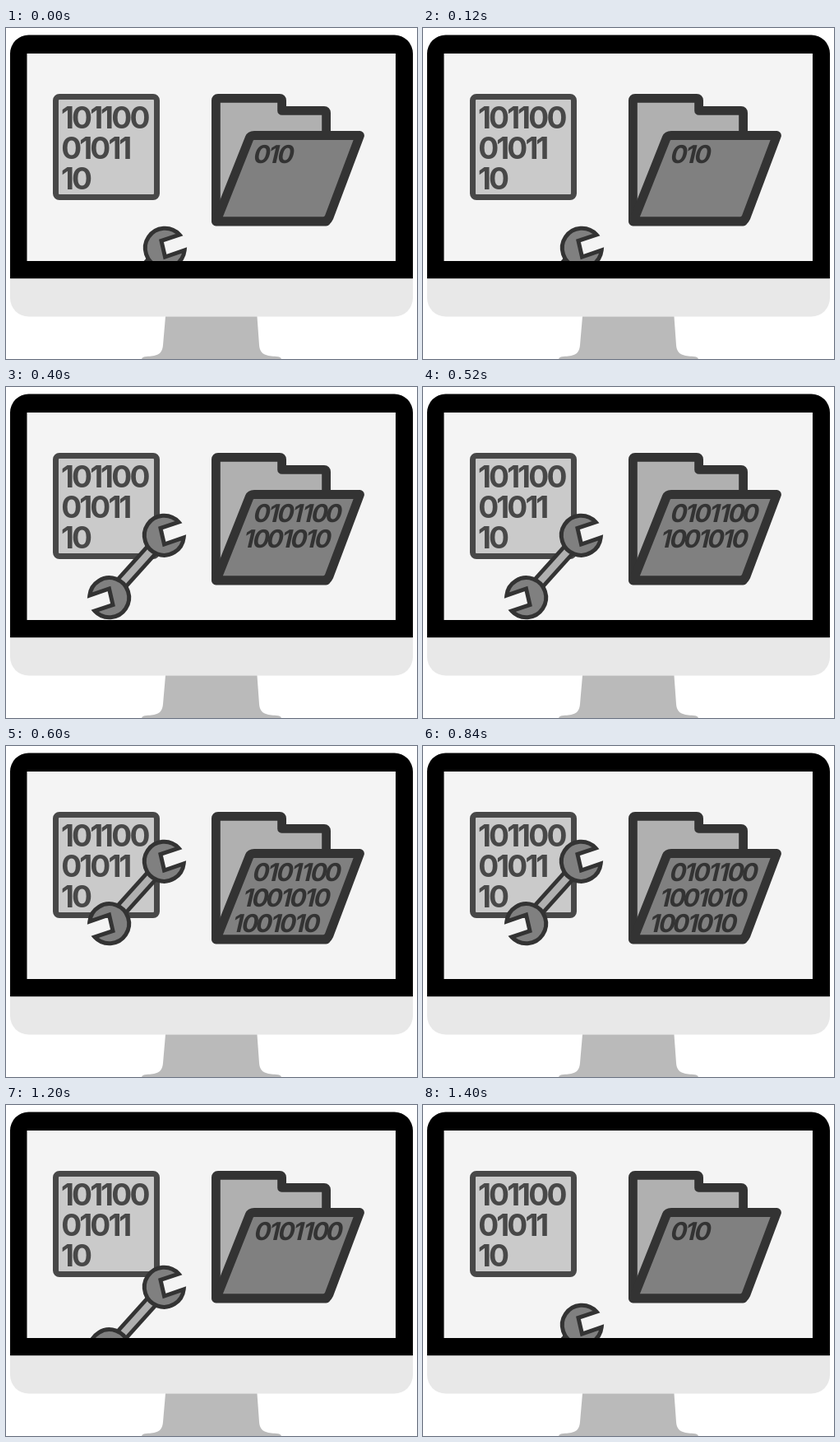
Animation, 500 px wide and 402 px high, one loop 1.6 s. Source, as an HTML page:

```html
<!DOCTYPE html>
<html lang="en">
<head>
<meta charset="utf-8">
<title>File repair</title>
<style>
html, body { margin: 0; width: 100%; height: 100%; overflow: hidden; background: #fff; }
svg { display: block; }
text { font: 700 37px Inter, sans-serif; fill: #484848; text-anchor: middle; }
.small text { font-size: 30px; fill: #333; }
.ink { stroke: #333; }
</style>
</head>
<body>
<svg width="500" height="402" viewBox="0 0 500 402">
  <defs>
    <path id="head" class="ink" fill="#808080" stroke-width="5"
      d="M210 124A24 24 0 1 0 216.200 143L192.500 151L188 131.500Z"/>
  </defs>
  <path fill="#f4f4f4" d="M20 25H480V290H20Z"/>

  <rect x="60.5" y="83.5" width="123" height="122" rx="4.5" fill="#cacaca" stroke="#484848" stroke-width="7"/>
  <g id="file"></g>

  <g class="ink" stroke-width="10.8" stroke-linejoin="round">
    <path fill="#b0b0b0" d="M255.400 235V88Q255.400 85.400 258 85.400H333Q335.600 85.400 335.600 88V100.400H387Q389.600 100.400 389.600 103V235Z"/>
    <path fill="#808080" d="M302 130.500H430.500L393 230Q391 234.600 386 234.600H256L296 134Q297.500 130.500 302 130.500Z"/>
  </g>
  <g id="folder" class="small"></g>

  <svg width="500" height="300">
    <g id="wrench">
      <path d="M182 152.500L136 203.500" stroke="#333" stroke-width="18"/>
      <path d="M182 152.500L136 203.500" stroke="#b0b0b0" stroke-width="8.500"/>
      <use href="#head"/>
      <use href="#head" transform="rotate(180 159 178)"/>
    </g>
  </svg>

  <path fill-rule="evenodd" d="M5 304.500V31A22.500 22.500 0 0 1 27.500 8.500H472.500A22.500 22.500 0 0 1 495 31V304.500ZM25.500 31V283H474V31Z"/>
  <path fill="#e8e8e8" d="M5 304.500H495V328A22.500 22.500 0 0 1 472.500 350.500H27.500A22.500 22.500 0 0 1 5 328Z"/>
  <path fill="#bababa" d="M194 350.500H305.500L308 385C309 398 318 398 329 399Q334 399 335 402H165Q166 399 171 399C182 398 190 398 191 385Z"/>
</svg>
<script>
const STEP = 200, STEPS = 8;
const wrenchAt = [[1, 127], [0, 81], [0, 40], [0, 0]];
const folderRows = ["0101100", "1001010", "1001010"];
const rowStart = [[301, 163.5], [288, 194.7], [275.5, 226]];
const $ = id => document.getElementById(id);

// Proportional digit spacing: each digit is centred in its own advance.
function addText(parent, str, x, y, zero, one, slant = 0) {
  const el = document.createElementNS("http://www.w3.org/2000/svg", "text");
  let pen = 0;
  const centres = [...str].map(c => {
    const w = c === "0" ? zero : one;
    pen += w;
    return pen - w / 2;
  });
  el.setAttribute("x", centres.join(" "));
  el.setAttribute("transform", `translate(${x} ${y}) skewX(${-slant})`);
  el.textContent = str;
  parent.append(el);
}

["101100", "01011", "10"].forEach((s, i) =>
  addText($("file"), s, 68.5, 121.5 + 37.3 * i, 22.3, 12.9));

let shown = -1;
function draw(now) {
  const i = Math.floor(now / STEP) % STEPS;
  const k = Math.min(i, STEPS - 1 - i);
  if (k === shown) return;
  shown = k;
  $("wrench").setAttribute("transform", `translate(${wrenchAt[k]})`);
  const rows = k ? folderRows.slice(0, k) : ["010"];
  const shift = k ? 2 - k : 0;
  $("folder").replaceChildren();
  rows.forEach((s, r) =>
    addText($("folder"), s, rowStart[r][0] + shift, rowStart[r][1], 17, 12.1, 13));
}

const start = performance.now();
function tick() {
  draw(performance.now() - start);
  requestAnimationFrame(tick);
}
tick();
</script>
</body>
</html>
```
